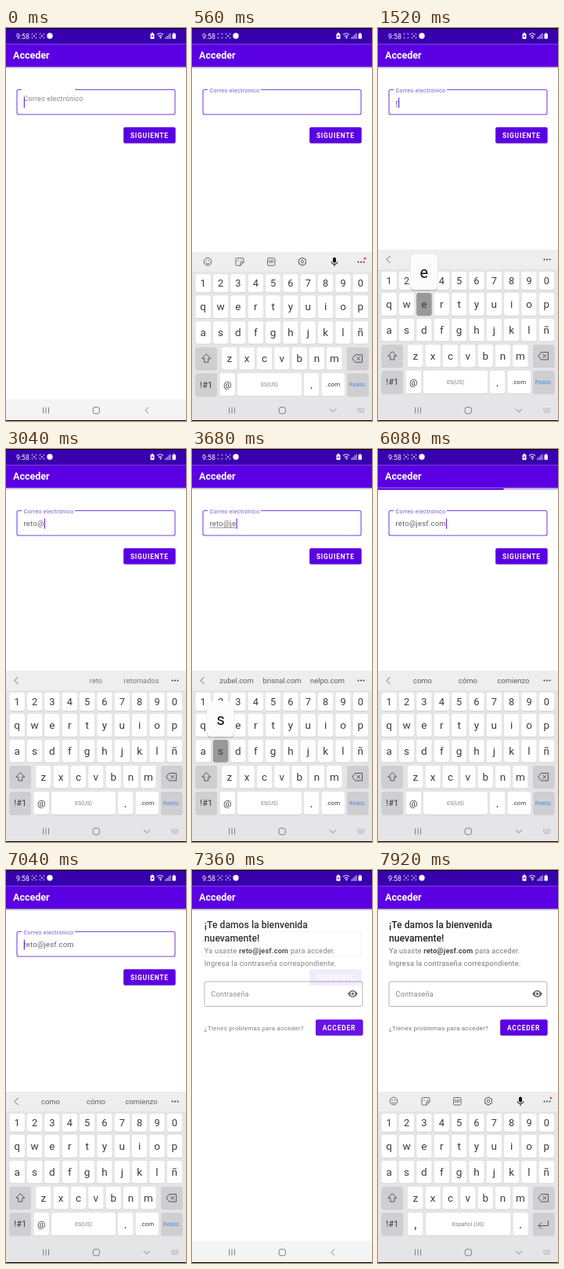
An HTML page for the animation above (8000 ms loop, 230 px wide and 500 px high).

```html
<!DOCTYPE html>
<html lang="es">
<head>
<meta charset="utf-8">
<title>Acceder</title>
<style>
  html, body { margin: 0; width: 100%; height: 100%; overflow: hidden; background: #fff; }
  svg { display: block; width: 100vw; height: 100vh; font-family: Roboto, "Noto Sans", sans-serif; white-space: pre; }
</style>
</head>
<body>
<svg id="stage" viewBox="0 0 230 500"></svg>
<script>
const LOOP = 8000, HOLD = 120;
const PURPLE = '#5b00e3', DARK_PURPLE = '#3900ae', OUTLINE = '#7d45dd';
const EMAIL = 'reto@jesf.com';
const DOMAINS = ['zubel.com', 'brisnal.com', 'nelpo.com'];
const INPUT = { size: 9.4, spacing: 0.25 };

// Each press shows a pressed key; its text is entered on release.
const PRESSES = [
  [1240, 'r'], [1480, 'e'], [1800, 't'], [2120, 'o'], [2840, '@'],
  [3200, 'j'], [3400, 'e'], [3640, 's'], [3960, 'f'], [4720, '.com']
];
const T = {
  keyboardIn: 320, domains: 3120, single: 4840, words: 5200,
  tap: 5640, progress: 5760, progressEnd: 6880,
  keyboardOut: 7120, next: 7200, nextEnd: 7480, keyboardBack: 7440
};

const clamp = x => Math.max(0, Math.min(1, x));
const ramp = (t, from, to) => clamp((t - from) / (to - from));
const easeOut = x => 1 - (1 - x) ** 3;
const mix = (a, b, k) => a + (b - a) * k;

const pen = document.createElement('canvas').getContext('2d');
function textWidth(s) {
  pen.font = `${INPUT.size}px Roboto, "Noto Sans", sans-serif`;
  return pen.measureText(s).width + s.length * INPUT.spacing;
}

const rect = (x, y, w, h, fill, r = 0, extra = '') =>
  `<rect x="${x}" y="${y}" width="${w}" height="${h}" rx="${r}" fill="${fill}" ${extra}/>`;
const line = (d, color, width = 1, extra = '') =>
  `<path d="${d}" fill="none" stroke="${color}" stroke-width="${width}" ${extra}/>`;
const shape = (d, fill) => `<path d="${d}" fill="${fill}"/>`;
const dot = (x, y, r, fill) => `<circle cx="${x}" cy="${y}" r="${r}" fill="${fill}"/>`;
const ring = (x, y, r, color, width = 1) =>
  `<circle cx="${x}" cy="${y}" r="${r}" fill="none" stroke="${color}" stroke-width="${width}"/>`;
const group = (body, x = 0, y = 0, opacity = 1) =>
  `<g transform="translate(${x} ${y})" opacity="${opacity}">${body}</g>`;
function text(s, x, y, size, fill, { weight = 400, spacing = 0, anchor = 'start' } = {}) {
  return `<text x="${x}" y="${y}" font-size="${size}" fill="${fill}" font-weight="${weight}" ` +
    `letter-spacing="${spacing}" text-anchor="${anchor}">${s}</text>`;
}
const centered = (s, x, y, size, fill, weight = 400) => text(s, x, y, size, fill, { weight, anchor: 'middle' });

function brackets(x, y, r, color) {
  const k = r * 0.4;
  return line(`M${x - r} ${y - k}V${y - r}H${x - k}M${x + k} ${y - r}H${x + r}V${y - k}` +
    `M${x + r} ${y + k}V${y + r}H${x + k}M${x - k} ${y + r}H${x - r}V${y + k}`, color, 0.7);
}

function header(t) {
  const blinkOff = t % 1000 >= 500 && t % 1000 < 850;
  const pale = '#ddd3f2';
  return rect(0, 0, 230, 20.5, DARK_PURPLE) + rect(0, 0, 230, 1, '#000') +
    text('9:58', 13, 13.5, 8.8, '#fff') +
    brackets(36, 10, 2.9, pale) + (blinkOff ? '' : dot(36, 10, 1.1, pale)) +
    brackets(46, 10, 2.9, pale) + dot(46, 10, 1.1, pale) +
    dot(56, 10, 3.7, '#fff') +
    rect(184.5, 7, 5, 7, '#fff', 1) + rect(186, 5.8, 2, 1.5, '#fff') + dot(187, 10.5, 1.1, DARK_PURPLE) +
    line('M193 8.5Q197 5 201 8.5M194.7 10.6Q197 8.5 199.3 10.6', pale, 1.1) + dot(197.5, 12.3, 1.1, '#fff') +
    line('M204 14V11.5M206 14V10M208 14V8M210 14V6.5', pale, 1) +
    rect(212.5, 7.3, 4.4, 6.5, '#fff', 0.8) + rect(213.8, 6.2, 1.8, 1.2, '#fff') +
    rect(0, 20.5, 230, 29, PURPLE) +
    text('Acceder', 9, 39, 12.5, '#fff', { weight: 700 }) +
    rect(0, 49.5, 230, 1, '#000', 0, 'opacity=".25"') + rect(0, 50.5, 230, 1.5, '#000', 0, 'opacity=".07"');
}

function progressBar(t) {
  const phase = ramp(t, T.progress, T.progressEnd);
  if (phase <= 0 || phase >= 1) return '';
  const left = Math.max(0, mix(-70, 240, phase * phase));
  const right = Math.min(230, mix(0, 300, Math.sqrt(phase)));
  return rect(0, 50, 230, 2, '#d3bdf5') + rect(left, 50, Math.max(0, right - left), 2, PURPLE);
}

function button(label, x, y, w, pressed = 0) {
  return rect(x, y + 0.8, w, 20.3, '#000', 2, 'opacity=".25"') + rect(x, y, w, 20.3, PURPLE, 2) +
    rect(x, y, w, 20.3, '#fff', 2, `opacity="${pressed * 0.25}"`) +
    text(label, x + 8.7, y + 13.4, 8.4, '#fff', { weight: 700, spacing: 0.8 });
}

const typedAt = t => PRESSES.filter(([p]) => t >= p + HOLD).map(p => p[1]).join('');

function emailScreen(t) {
  const typed = typedAt(t), done = t >= T.progressEnd;
  const float = mix(0.28, 1, easeOut(ramp(t, 0, 150)));
  const lastEdit = Math.max(0, done ? T.progressEnd : 0,
    ...PRESSES.map(([p]) => p + HOLD).filter(p => p <= t));
  const cursorX = 22.8 + (done ? 0 : textWidth(typed));
  const composing = typed && !typed.endsWith('@') && typed !== EMAIL;
  const cursorOn = (t - lastEdit) % 1000 < 500;
  const pressed = ramp(t, T.tap, T.tap + 120) * (1 - ramp(t, T.tap + 200, T.tap + 420));
  let out = rect(0, 50, 230, 450, '#fff') +
    line('M20 78.5H16Q14 78.5 14 80.5V108Q14 110 16 110H214Q216 110 216 108V80.5Q216 78.5 214 78.5H88', OUTLINE, 1.1) +
    text('Correo electrónico', 22.5, mix(98, 81.5, float), mix(9.4, 7.3, float),
      float < 0.6 ? '#85838f' : '#7a55d0', { spacing: 0.24 }) +
    text(typed, 22.5, 98, INPUT.size, '#606060', { spacing: INPUT.spacing });
  if (composing) out += line(`M22.5 100H${cursorX}`, '#666', 0.7);
  if (cursorOn) out += rect(cursorX, 88.5, 1, 13, PURPLE);
  return out + button('SIGUIENTE', 150.2, 126.2, 66.4, pressed);
}

function passwordScreen() {
  const gray = '#777';
  return rect(0, 50, 230, 450, '#fff') +
    text('¡Te damos la bienvenida', 14, 74, 12.2, '#222', { weight: 500 }) +
    text('nuevamente!', 14, 91, 12.2, '#222', { weight: 500 }) +
    text(`Ya usaste <tspan font-weight="700" fill="#444">${EMAIL}</tspan> para acceder.`, 14, 105.5, 9.2, gray, { spacing: 0.2 }) +
    text('Ingresa la contraseña correspondiente.', 14, 121.5, 9.3, gray, { spacing: 0.2 }) +
    rect(14, 142, 202, 31.5, 'none', 2, 'stroke="#b3b3b3" stroke-width="1"') +
    text('Contraseña', 22.5, 161, 9.2, '#858585', { spacing: 0.15 }) +
    shape('M197 157.5Q203.5 148.5 210 157.5Q203.5 166.5 197 157.5Z', '#666') +
    dot(203.5, 157.5, 2.9, '#fff') + dot(203.5, 157.5, 1.7, '#666') +
    text('¿Tienes problemas para acceder?', 14, 204, 8.1, gray, { spacing: 0.2 }) +
    button('ACCEDER', 156.2, 190.2, 60.4);
}

// Keys as { label, x, y, w, h }
const PITCH = 22.35;
const keyRow = (chars, first, y, h, size) => [...chars].map((label, i) =>
  ({ label, x: first + i * PITCH - 9.7, y, w: 19.4, h, size }));
const LETTER_KEYS = [
  ...keyRow('1234567890', 14.2, 310, 23, 12.8),
  ...keyRow('qwertyuiop', 14.2, 337, 29),
  ...keyRow('asdfghjklñ', 14.2, 370, 28.5),
  ...keyRow('zxcvbnm', 47.8, 403, 28.5)
];
const key = (label, x, w, size = 13.5) => ({ label, x, y: 436, w, h: 29, size });
const EMAIL_KEYS = [key('@', 35.5, 19.5, 11.8), key('ES(US)', 58, 82, 7.2), key('.', 143, 19.4, 16), key('.com', 165.5, 29.5, 8)];
const TEXT_KEYS = [key(',', 38, 19.5, 16), key('Español (US)', 61, 108.5, 7.2), key('.', 172.5, 19.4, 16)];

function keyCap({ label, x, y, w, h, size = 13.5 }, fill = '#fff') {
  const color = size < 8 ? '#808080' : '#3c3c3c';
  return rect(x, y + 0.7, w, h, '#cbcbce', 3) + rect(x, y, w, h, fill, 3) +
    centered(label, x + w / 2, y + h / 2 + size * 0.34, size, color);
}

function popup({ label, x, y, w }) {
  const cx = x + w / 2, top = y - 49;
  return rect(cx - 18, top + 0.5, 36, 46.5, '#000', 6, 'opacity=".14"') +
    rect(cx - 17.5, top, 35, 45, '#fcfcfc', 6) + centered(label, cx, top + 30, 20, '#111');
}

function toolIcons() {
  const c = '#666';
  return ring(20, 294, 4.8, c) + dot(18.3, 292.7, 0.8, c) + dot(21.7, 292.7, 0.8, c) +
    line('M17.3 295.3Q20 298.4 22.7 295.3', c) +
    line('M57.5 289.5H64.5Q66 289.5 66 291V295L62 299H57.5Q56 299 56 297.5V291Q56 289.5 57.5 289.5ZM62 299V295H66', c) +
    dot(59, 293, 0.8, c) + dot(63, 293, 0.8, c) +
    rect(96.5, 289.5, 9.5, 9.5, 'none', 1.5, `stroke="${c}"`) + centered('GIF', 101.2, 296, 4.6, c, 700) +
    line('M141 289L145.4 291.5V296.5L141 299L136.6 296.5V291.5Z', c, 1.1, 'stroke-linejoin="round"') + ring(141, 294, 1.7, c) +
    rect(180, 288.5, 4, 7, '#111', 2) + line('M178 294Q178 297.3 182 297.3Q186 297.3 186 294M182 297.3V300', '#111') +
    dot(221, 290, 1.5, '#f0552b');
}

function suggestions(t, typed) {
  const show = (words, opacity = 1) =>
    group(words.map((w, i) => centered(w, 57 + i * 58, 298, 9.4, '#5c5c5c')).join(''), 0, 0, opacity);
  if (t >= T.words) return show(['como', 'cómo', 'comienzo']);
  if (t >= T.single) return show(DOMAINS.slice(0, 1));
  if (t >= T.domains) return show(DOMAINS);
  if (typed.length < 2) return '';
  const words = { re: ['re', 'red', 'resto'], ret: ['ret', 'reto', 'retornados'] }[typed] || ['', 'reto', 'retornados'];
  return show(words, 1 - 0.6 * ramp(t, 3000, T.domains));
}

function keyboard(t) {
  const typed = typedAt(t), password = t >= T.keyboardBack;
  const press = PRESSES.find(([p]) => t >= p && t < p + HOLD);
  const gray = '#cfcfd1', icon = '#555';
  const keys = [...LETTER_KEYS, ...(password ? TEXT_KEYS : EMAIL_KEYS)];
  const active = press && keys.find(k => k.label === press[1]);
  const special = (x, y, w, h, label = '', size = 11) => keyCap({ label, x, y, w, h, size }, gray);
  let out = rect(0, 282, 230, 218, '#e5e5e7') + rect(0, 282, 230, 25, '#eeeeef') +
    [212.5, 216, 219.5].map(x => dot(x, 294.5, 1, '#333')).join('');
  out += password || !typed ? toolIcons()
    : line('M15.5 290L11 294.5L15.5 299', '#666') + suggestions(t, typed);
  out += keys.map(k => keyCap(k, k === active ? '#999' : '#fff')).join('') +
    special(4.5, 403, 27.5, 28.5) + line('M18.3 411.5L23.8 417.3H20.8V422H15.8V417.3H12.8Z', icon, 1, 'stroke-linejoin="round"') +
    special(198, 403, 27.5, 28.5) + line('M208.5 412.5H217.5V422H208.5L204.8 417.2ZM210.5 415L215 419.5M215 415L210.5 419.5', icon) +
    special(4.5, 436, 27.5, 29, '!#1') +
    special(198, 436, 27.5, 29) +
    (password
      ? line('M217.5 446V452.5H205M209 448.5L205 452.5L209 456.5', icon)
      : centered('Realiz.', 211.7, 453, 7.4, '#4a8ae8'));
  return out + (active && active.label.length === 1 ? popup(active) : '');
}

function navBar(open) {
  const c = '#808080';
  return rect(0, 472, 230, 28, open ? '#e5e5e7' : '#f4f4f4') +
    line('M47.5 482.5V490.5M51 482.5V490.5M54.5 482.5V490.5', c) +
    rect(111.2, 482.4, 8.3, 8.3, 'none', 2.8, `stroke="${c}"`) +
    (open
      ? line('M176 484.5L180 488.5L184 484.5', c) +
        line('M211 484H221M211 486.2H221M212.5 488.6H219.5', '#999', 1.1, 'stroke-dasharray="1.2 .8"')
      : line('M182 482.5L178 486.5L182 490.5', c)) +
    rect(0, 499, 230, 1, '#000');
}

// 0 when hidden, 1 when fully raised
function keyboardLevel(t) {
  if (t >= T.keyboardBack) return easeOut(ramp(t, T.keyboardBack, T.keyboardBack + 280));
  return easeOut(ramp(t, T.keyboardIn, T.keyboardIn + 320)) *
    (1 - easeOut(ramp(t, T.keyboardOut, T.keyboardOut + 240)));
}

function scene(t) {
  const level = keyboardLevel(t);
  const next = easeOut(ramp(t, T.next, T.nextEnd));
  return (next < 1 ? emailScreen(t) : '') +
    (next > 0 ? group(passwordScreen(), 24 * (1 - next), 0, next) : '') +
    header(t) + progressBar(t) +
    (level > 0 ? group(keyboard(t), 0, 218 * (1 - level)) : '') +
    navBar(level > 0);
}

const stage = document.getElementById('stage');
function draw() {
  stage.innerHTML = scene(performance.now() % LOOP);
  requestAnimationFrame(draw);
}
draw();
</script>
</body>
</html>
```
